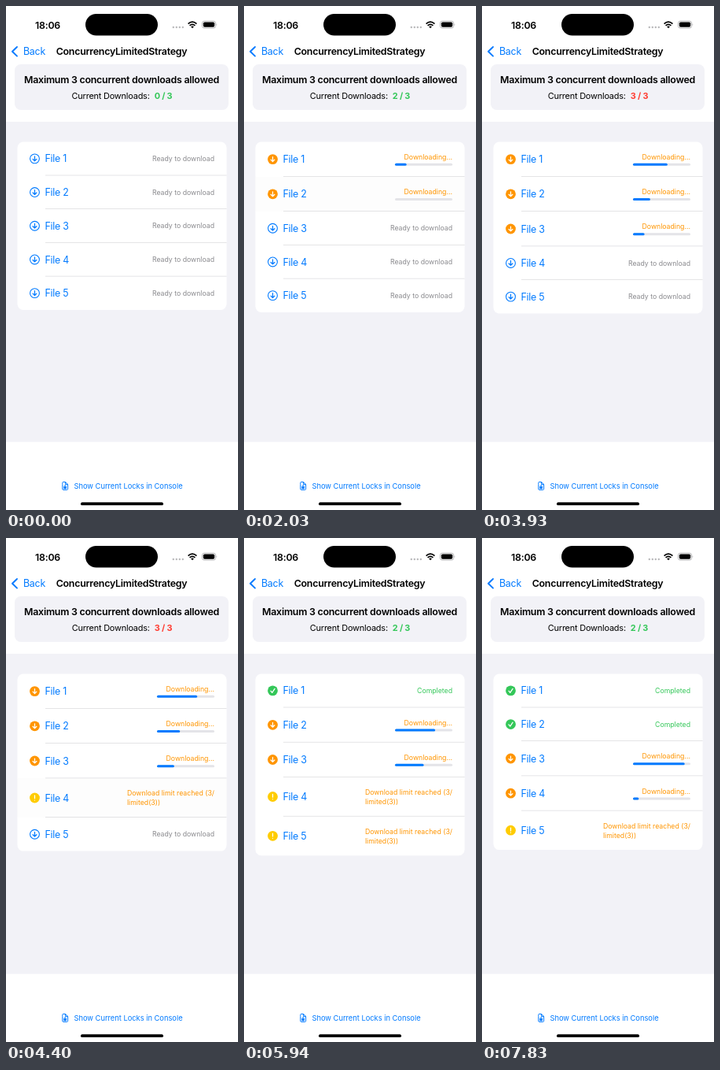
These frames come from a looping animation (295 by 640 pixels, 8 s). An HTML page:

```html
<!DOCTYPE html>
<html lang="en">
<head>
<meta charset="utf-8">
<title>Concurrency limited downloads</title>
<style>
  html, body { margin: 0; width: 100%; height: 100%; overflow: hidden; background: #fff; }
  svg { display: block; width: 295px; height: 640px; font-family: Inter, Roboto, sans-serif; }
  .body { font-size: 12.4px; letter-spacing: -.24px; }
  .head { font-weight: 600; }
  .sub { font-size: 10.9px; letter-spacing: -.19px; }
  .note { font-size: 8.72px; }
  .foot { font-size: 9.3px; }
  .line { fill: none; stroke-linecap: round; stroke-linejoin: round; }
</style>
</head>
<body>
<svg viewBox="0 0 295 640">
  <text class="body head" x="37" y="28.5">18:06</text>
  <rect x="101" y="10" width="92" height="27.5" rx="13.75"/>
  <g fill="#b9b9bb">
    <circle cx="212.8" cy="27" r="1.2"/><circle cx="216.8" cy="27" r="1.2"/>
    <circle cx="220.8" cy="27" r="1.2"/><circle cx="224.8" cy="27" r="1.2"/>
  </g>
  <g class="line" stroke="#000" stroke-width="1.8" style="stroke-linecap:butt">
    <path d="M231.6 22.6Q237 17.6 242.4 22.6M233.6 24.9Q237 21.8 240.4 24.9"/>
  </g>
  <path d="M235.1 26.2Q237 24.8 238.9 26.2L237 28.3Z"/>
  <rect x="249.4" y="19.2" width="17.2" height="8.9" rx="2.8" fill="none" stroke="#a5a5a7" stroke-width=".8"/>
  <rect x="250.8" y="20.6" width="14.4" height="6.1" rx="1.7"/>
  <path d="M267.6 22.2Q269 23.6 267.6 25.1Z" fill="#a5a5a7"/>

  <path class="line" d="M14 52L8 57.8L14 63.6" stroke="#007aff" stroke-width="1.9"/>
  <text class="body" x="22" y="62" fill="#007aff">Back</text>
  <text class="body head" x="147" y="62" text-anchor="middle">ConcurrencyLimitedStrategy</text>

  <rect x="11" y="74" width="272" height="58" rx="8" fill="#f2f2f7"/>
  <text class="body head" x="147" y="97.5" text-anchor="middle">Maximum 3 concurrent downloads allowed</text>
  <text class="sub" x="147.5" y="118" text-anchor="middle">Current Downloads:<tspan id="count" dx="6" font-weight="700"></tspan></text>

  <rect y="147" width="295" height="406.5" fill="#f2f2f7"/>
  <g id="list"></g>

  <g class="line" stroke="#007aff" stroke-width="1">
    <path d="M71.8 607V605.4Q71.8 604.4 72.8 604.4H75.4L78.6 607.6V613.4Q78.6 614.4 77.6 614.4H72.8Q71.8 614.4 71.8 613.4ZM75.4 604.6V607.6H78.4"/>
    <path d="M74 611V610A1.1 1.1 0 0 1 76.2 610V611"/>
  </g>
  <rect x="73.3" y="610.6" width="3.6" height="2.6" rx=".5" fill="#007aff"/>
  <text class="foot" x="86.5" y="612.6" fill="#007aff">Show Current Locks in Console</text>
  <rect x="95" y="630.3" width="105" height="3.8" rx="1.9"/>
</svg>
<script>
const LOOP = 8000, TOP = 172.5, LEFT = 14.5, WIDTH = 266;
const BLUE = '#007aff', GREEN = '#34c759', ORANGE = '#ff9500', YELLOW = '#ffcc00', RED = '#ff3b30';
const HEIGHT = { ready: 42.7, done: 42.7, busy: 44.2, limit: 49.8 };

// Times in ms: taps, state changes, and each further 10% of progress.
const files = [
  { taps: [500], start: 610, done: 5940, ticks: [1040, 1580, 2360, 2660, 3390, 3740, 4280, 4840, 5390] },
  { taps: [1810], start: 1920, done: 7290, ticks: [2660, 3150, 3740, 4280, 4840, 5030, 5620, 6110, 6640, 7180] },
  { taps: [2840], start: 2950, ticks: [3390, 3930, 4400, 5030, 5620, 6110, 6640, 7180, 7730] },
  { taps: [4170, 7290], limit: 4280, start: 7400, ticks: [7830] },
  { taps: [5390], limit: 5500, ticks: [] }
];

const stateAt = (f, t) =>
  t >= f.done ? 'done' : t >= f.start ? 'busy' : t >= f.limit ? 'limit' : 'ready';

// Pressed row: full, then fading in short steps after release.
function pressAt(f, t) {
  const age = Math.min(...f.taps.map(tap => t < tap ? Infinity : t - tap));
  return age < 110 ? 1 : age < 220 ? .5 : age < 320 ? .05 : 0;
}

const note = (x, y, text, color, anchor = 'end') =>
  `<text class="note" x="${x}" y="${y}" fill="${color}" text-anchor="${anchor}">${text}</text>`;
const bar = (y, w, color) =>
  `<rect x="192" y="${y - 1.5}" width="${w}" height="3" rx="1.5" fill="${color}"/>`;

const ARROW = 'M0 -3V2.8M-2.4 .5L0 2.9L2.4 .5';
const ICONS = {
  ready: ['none', BLUE, ARROW],
  busy: [ORANGE, '#fff', ARROW],
  done: [GREEN, '#fff', 'M-2.5 .3L-.7 2.5L2.6 -2.4'],
  limit: [YELLOW, '#fff', 'M0 -3.1V.7M0 3V3.05']
};
function icon(state, y) {
  const [fill, ink, path] = ICONS[state];
  const ring = state === 'ready' ? `r="5.9" stroke="${BLUE}"` : 'r="6.4"';
  return `<g class="line" transform="translate(36.5 ${y})" stroke-width="1.1">
    <circle ${ring} fill="${fill}"/><path d="${path}" stroke="${ink}" stroke-width="1.25"/></g>`;
}

function status(state, y, mid, progress) {
  if (state === 'ready') return note(265, mid + 3.2, 'Ready to download', 'rgba(60,60,67,.6)');
  if (state === 'done') return note(265, mid + 3.2, 'Completed', GREEN);
  if (state === 'limit')
    return note(154, y + 22.2, 'Download limit reached (3/', ORANGE, 'start') +
           note(154, y + 34.2, 'limited(3))', ORANGE, 'start');
  return note(265, y + 22.5, 'Downloading...', ORANGE) +
         bar(y + 28.8, 73, '#e4e4e8') + (progress ? bar(y + 28.8, 73 * progress, BLUE) : '');
}

function listAt(t) {
  let y = TOP, rows = '';
  files.forEach((f, i) => {
    const state = stateAt(f, t), h = HEIGHT[state], mid = y + h / 2;
    const press = pressAt(f, t), progress = f.ticks.filter(k => t >= k).length / 10;
    if (press) rows += `<rect x="${LEFT}" y="${y}" width="${WIDTH}" height="${h}" fill="#d1d1d4" opacity="${press}"/>`;
    rows += icon(state, mid) +
      `<text class="body" x="49.5" y="${mid + 4.6}" fill="${BLUE}">File ${i + 1}</text>` +
      status(state, y, mid, progress);
    y += h;
    if (i < files.length - 1) rows += `<rect x="50" y="${y - .5}" width="231" height=".6" fill="#d3d3d6"/>`;
  });
  const card = `<rect x="${LEFT}" y="${TOP}" width="${WIDTH}" height="${y - TOP}" rx="7.5" fill="#fff"/>`;
  return `<clipPath id="card">${card}</clipPath>${card}<g clip-path="url(#card)">${rows}</g>`;
}

const list = document.getElementById('list'), count = document.getElementById('count');
let shown = '';
function draw() {
  const t = (performance.now() + 8) % LOOP; // half a display frame ahead
  const html = listAt(t);
  if (html !== shown) {
    list.innerHTML = shown = html;
    const busy = files.filter(f => stateAt(f, t) === 'busy').length;
    count.textContent = `${busy} / 3`;
    count.setAttribute('fill', busy < 3 ? GREEN : RED);
  }
  requestAnimationFrame(draw);
}
draw();
</script>
</body>
</html>
```
